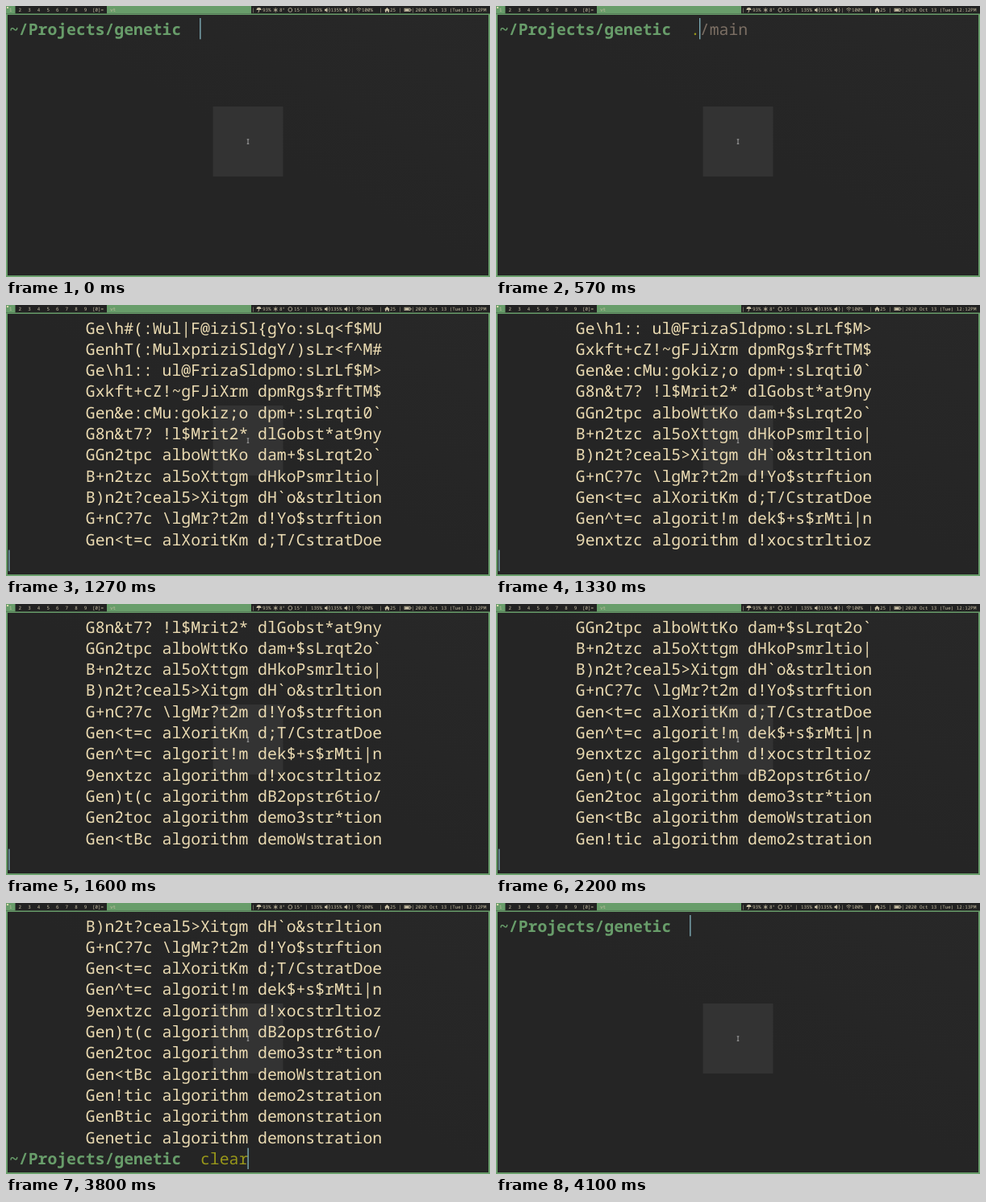
Animation of 600 by 337 pixels, one loop 5010 ms. Source, as an HTML page:

```html
<!DOCTYPE html>
<html lang="en">
<head>
<meta charset="utf-8">
<title>Terminal: genetic algorithm</title>
<style>
  html, body { margin: 0; width: 100%; height: 100%; overflow: hidden; background: #252525; }
  svg { display: block; width: 100%; height: 100%; }
  text {
    white-space: pre; font-family: "Noto Sans Mono", "DejaVu Sans Mono", monospace;
    font-variant-ligatures: none; text-rendering: geometricPrecision;
  }
  #screen text { font-size: 19.75px; font-weight: 350; fill: #ebdbb2; }
  #screen .prompt { fill: #689d6a; font-weight: 700; }
  #screen .command { fill: #98971a; }
  #screen .partial { fill: #cc241d; font-weight: 700; }
  #screen .hint { fill: #7c6f64; }
  #bar text { font-size: 5.87px; fill: #c9bfa5; }
  .icon { fill: none; stroke: #c9bfa5; stroke-width: .8; }
  .solid { fill: #c9bfa5; }
</style>
</head>
<body>
<svg viewBox="0 0 600 337" preserveAspectRatio="none">
  <defs>
    <linearGradient id="wall" x1="0" y1="1" x2="1" y2="0">
      <stop offset=".5" stop-color="#252525"/>
      <stop offset="1" stop-color="#282828"/>
    </linearGradient>
    <path id="speaker" class="solid" d="M0 3.8h1.4L3.4 2v6L1.4 6.2H0zM4.2 3.4q1.4 1.6 0 3.2zM5.1 2.4q2.4 2.6 0 5.2l.5.4q2.6-3 0-6z"/>
  </defs>

  <rect width="600" height="337" fill="url(#wall)"/>
  <rect x="256.5" y="125" width="87" height="87" fill="#333"/>
  <rect x="1" y="10" width="598" height="326" fill="none" stroke="#689d6a" stroke-width="2"/>

  <g id="bar">
    <rect width="600" height="9.5" fill="#222"/>
    <rect width="11.5" height="9.5" fill="#689d6a"/>
    <rect x="125" width="179" height="9.5" fill="#689d6a"/>
    <rect x="1" y="1" width="2" height="2" fill="#ebdbb2"/>
    <g class="icon">
      <path class="solid" stroke="none" d="M310.5 5a3 3 0 0 1 6 0z"/>
      <path d="M313.5 5v2.2q-.8.9-1.4 0"/>
      <path d="M334.2 2.2v5.6M331.8 3.6l4.8 2.8M331.8 6.4l4.8-2.8"/>
      <circle cx="352.3" cy="5" r="2.4"/>
      <path d="M434.3 4q3-2.8 6 0M435.6 5.5q1.7-1.6 3.4 0M437.3 6.6v1"/>
      <path class="solid" stroke="none" d="M469 5.2l3.4-3.2 3.4 3.2h-.9v2.6h-1.7V6h-1.6v1.8H470V5.2z"/>
      <rect x="494" y="3.2" width="7" height="3.4"/>
      <path class="solid" stroke="none" d="M494.6 3.8h5v2.2h-5zM501.6 4h.9v1.8h-.9z"/>
    </g>
    <use href="#speaker" x="395"/>
    <use href="#speaker" x="419.5"/>
  </g>

  <g id="screen"></g>
  <path d="M298.7 165.9h2.6M300 165.9v5.4M298.7 171.3h2.6" fill="none" stroke="#bbb" stroke-width=".8"/>
</svg>

<script>
const LOOP = 5010, LEFT = 4, TOP = 15, CELL = 11.85, ROW = 26.33, ROWS = 12;
const $ = id => document.getElementById(id);

function add(parent, tag, attrs, content = "") {
  const el = document.createElementNS("http://www.w3.org/2000/svg", tag);
  for (const key in attrs) el.setAttribute(key, attrs[key]);
  el.textContent = content;
  return parent.appendChild(el);
}

// Status bar
const label = (x, content) => add($("bar"), "text", { x, y: 7 }, content);
for (let tag = 1; tag < 10; tag++) label(4 + (tag - 1) * 11.6, tag);
label(107, "[0]=");
label(129, "vt");
[[318, "93%"], [339, "8°"], [357, "15°"], [378, "135%"], [402.5, "135%"], [441, "100%"], [476, "25"]]
  .forEach(([x, content]) => label(x, content));
[304.5, 371, 427.5, 462.5, 486.5, 502.5].forEach(x => label(x, "|"));
const clock = label(507.5, "");

// Program output: a random start, a drift, then the recorded generations
const seed = "G+#&-(Q wy(RrGcimeugY)S5mq<fiBU";
const evolved = [
  "Ge\\h1:: ul@FrizaSldpmo:sLrLf$M>",
  "Gxkft+cZ!~gFJiXrm dpmRgs$rftTM$",
  "Gen&e:cMu:gokiz;o dpm+:sLrqti0`",
  "G8n&t7? !l$Mrit2* dlGobst*at9ny",
  "GGn2tpc alboWttKo dam+$sLrqt2o`",
  "B+n2tzc al5oXttgm dHkoPsmrltio|",
  "B)n2t?ceal5>Xitgm dH`o&strltion",
  "G+nC?7c \\lgMr?t2m d!Yo$strftion",
  "Gen<t=c alXoritKm d;T/CstratDoe",
  "Gen^t=c algorit!m dek$+s$rMti|n",
  "9enxtzc algorithm d!xocstrltioz",
  "Gen)t(c algorithm dB2opstr6tio/",
  "Gen2toc algorithm demo3str*tion",
  "Gen<tBc algorithm demoWstration",
  "Gen!tic algorithm demo2stration",
  "GenBtic algorithm demonstration",
  "Genetic algorithm demonstration"
];
const DRIFT = 8;
const noise = n => { const v = Math.sin(n * 127.1) * 43758.5; return v - Math.floor(v); };
const drift = Array.from({ length: DRIFT }, (_, g) => [...seed].map((ch, i) => {
  const n = g * 31 + i + 1;
  if (noise(n) < .3) return String.fromCharCode(33 + Math.floor(noise(n + 500) * 94));
  return noise(i + 900) < (g + 1) / (DRIFT + 1) ? evolved[0][i] : ch;
}).join(""));
const output = [seed, ...drift, ...evolved];

// Each row is a list of [column, text, class]
const prompt = (...typed) => [[0, "~/Projects/genetic", "prompt"], ...typed];
const running = count => [
  prompt([20, "./main", "command"]),
  [[0, "evolution running on 4 cores", ""]],
  ...output.slice(0, count).map(line => [[8, line, ""]])
];
const done = (...typed) => [...running(output.length), prompt(...typed)];
const printing = (time, count) => [time, [...running(count), []], 0];

// [time, rows, cursor column]
const steps = [
  [0, [prompt()], 20],
  [570, [prompt([20, ".", "command"], [21, "/main", "hint"])], 21],
  [700, [prompt([20, "./main", "command"])], 26],
  ...[[1100, 1], [1130, 4], [1160, 8], [1200, 12], [1230, 15], [1260, 18], [1330, 20],
      [1430, 21], [1500, 22], [1600, 23], [2200, 24], [2530, 25], [3070, 26]]
    .map(([time, count]) => printing(time, count)),
  [3100, done(), 20],
  [3630, done([20, "c", "partial"], [21, "lear", "hint"]), 21],
  [3800, done([20, "clear", "command"]), 25],
  [4000, [[]], 0],
  [4100, [prompt()], 20]
];

function draw(rows, column) {
  const screen = $("screen"), visible = rows.slice(-ROWS);
  screen.replaceChildren();
  visible.forEach((row, r) => row.forEach(([col, content, type]) =>
    add(screen, "text", { x: LEFT + col * CELL, y: TOP + r * ROW + 20.5, class: type }, content)));
  add(screen, "rect", {
    x: LEFT + column * CELL - .8, y: TOP + (visible.length - 1) * ROW,
    width: 1.3, height: ROW, fill: "#83b5c0"
  });
}

const start = performance.now();
let shown;
function tick() {
  const t = (performance.now() - start) % LOOP;
  const step = steps.findLast(([time]) => time <= t);
  if (step !== shown) draw(step[1], step[2]);
  shown = step;
  const now = `2020 Oct 13 (Tue) 12:${t < 4030 ? 12 : 13}PM`;
  if (clock.textContent !== now) clock.textContent = now;
  requestAnimationFrame(tick);
}
tick();
</script>
</body>
</html>
```
